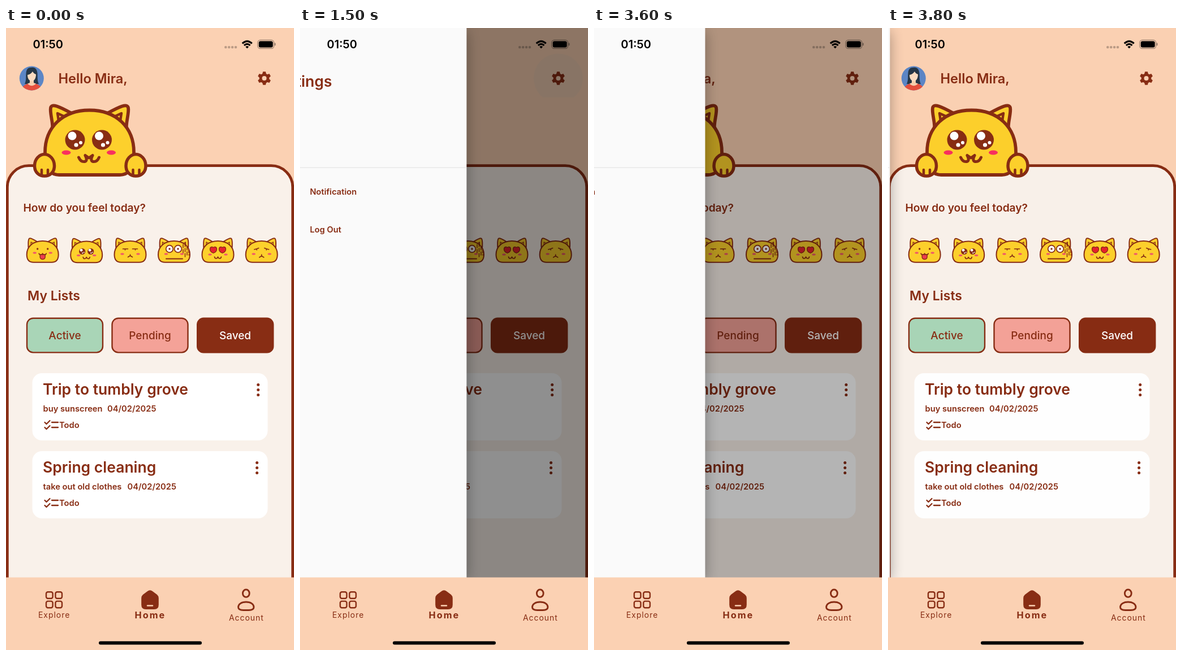
These frames come from a looping animation (509x1101 px, 3.9 s). An HTML page:

```html
<!DOCTYPE html>
<html lang="en">
<head>
<meta charset="utf-8">
<title>Mood lists</title>
<style>
@property --open { syntax: "<number>"; inherits: true; initial-value: 0; }
:root { --brown: #882d14; --peach: #fbd1b3; --yellow: #fdd02c; }
html, body { margin: 0; width: 100%; height: 100%; overflow: hidden; background: var(--peach); }
.stage { position: relative; width: 509px; height: 1101px; overflow: hidden; animation: slide 3900ms step-end infinite; }
.stage > * { position: absolute; left: 0; top: 0; }
svg { display: block; }
.scrim { width: 509px; height: 973px; background: #000; opacity: calc(var(--open) * .54); }
.drawer {
  width: 361.5px; height: 973px; background: #fafafa;
  transform: translateX(calc((var(--open) - 1) * 361.5px));
  opacity: calc(var(--open) * 1000);
  box-shadow: 0 6px 25px rgba(0,0,0,.36);
}
.tap { transform-origin: 456.5px 89px; fill: #97bdcc; animation: tap 3900ms step-end infinite; }
@keyframes slide {
  0% { --open: 0; }
  35.89% { --open: .189; }
  38.455% { --open: .813; }
  41.02% { --open: .969; }
  43.585% { --open: 1; }
  92.3% { --open: .542; }
  94.865% { --open: .1; }
  97.43%, 100% { --open: .008; }
}
@keyframes tap {
  0% { opacity: 0; transform: scale(1); }
  35.89% { opacity: .24; transform: scale(1); }
  38.455% { opacity: .09; transform: scale(1.1); }
  41.02%, 100% { opacity: 0; transform: scale(1.1); }
}
text { font-family: Inter, "Open Sans", sans-serif; font-weight: 600; fill: var(--brown); white-space: pre; }
.title { font-size: 26.5px; }
.note { font-size: 14.7px; }
.btn { font-size: 19px; font-weight: 500; text-anchor: middle; }
.tab { font-size: 14px; font-weight: 400; letter-spacing: .95px; }
.line { fill: none; stroke: var(--brown); stroke-linecap: round; stroke-linejoin: round; }
.coat { fill: var(--yellow); stroke: var(--brown); stroke-linejoin: round; }
.solid { fill: var(--brown); }
.blush { fill: #f0586a; }
.white { fill: #fff; }
</style>
</head>
<body>
<div class="stage">

<svg width="509" height="1101" viewBox="0 0 509 1101">
  <defs>
    <g id="kitty">
      <g id="ear">
        <path class="coat" d="M-24.500 -2C-26 -11 -25.500 -21 -23.500 -22.500C-21 -24 -14 -19.500 -9 -16.500"/>
        <path class="line" d="M-20.500 -11L-20.500 -16L-16 -14" stroke-width="1.300"/>
      </g>
      <use href="#ear" transform="scale(-1 1)"/>
      <path class="coat" d="M-28 6C-28 -8 -17 -18 0 -18S28 -8 28 6C28 15.500 24 19.700 16 19.700H-16C-24 19.700 -28 15.500 -28 6Z"/>
    </g>
    <g id="cheeks">
      <ellipse class="blush" cx="-14" cy="5" rx="3.200" ry="1.700"/>
      <ellipse class="blush" cx="14" cy="5" rx="3.200" ry="1.700"/>
    </g>
    <path id="smile" class="line" d="M-6 10Q-5.500 13 -3 13Q-.5 12.500 0 10Q.5 12.500 3 13Q5.500 13 6 10"/>
    <g id="shine">
      <circle class="solid" r="17.500"/>
      <circle class="white" cx="-5" cy="-7" r="7.500"/>
      <circle class="white" cx="2" cy="9" r="3.600"/>
      <circle class="white" cx="10" cy="5" r="3"/>
    </g>
    <g id="paw">
      <path class="coat" stroke-width="5.500" d="M-17.500 1C-17.500 -11 -9 -19.500 0 -19.500S17.500 -11 17.500 1C17.500 13 9 19 0 19S-17.500 13 -17.500 1Z"/>
      <path class="line" stroke-width="4.500" d="M-5 8V18M6 8V18"/>
    </g>
    <path id="heart" fill="#e6222e" stroke="#882d14" stroke-width="1.300" d="M0 5.500C-4 4 -6 1 -6 -1.500C-6 -6 -1.800 -6.500 0 -4.300C1.800 -6.500 6 -6 6 -1.500C6 1 4 4 0 5.500Z"/>
    <g id="more" class="solid"><circle cy="-9" r="2.500"/><circle r="2.500"/><circle cy="9" r="2.500"/></g>
    <g id="todo">
      <rect class="white" x="46.500" y="0" width="416" height="119" rx="17"/>
      <path class="line" stroke-width="2.300" stroke-linecap="butt" d="M68.500 87L71.500 90L77.500 84M68.500 96L71.500 99L77.500 93M81 87H92M81 96H92"/>
      <text class="note" x="94" y="96.500">Todo</text>
    </g>
    <path id="tooth" class="solid" d="M-3.400 -7.500L-2.400 -11.700H2.400L3.400 -7.500Z"/>
    <clipPath id="bar"><rect x="400" y="40" width="109" height="83"/></clipPath>
    <clipPath id="face"><circle cx="45.300" cy="89" r="21.500"/></clipPath>
  </defs>

  <rect width="509" height="1101" fill="#fbd1b3"/>

  <g clip-path="url(#face)">
    <rect x="23" y="67" width="45" height="45" fill="#5c86c6"/>
    <path fill="#263747" d="M33 99C36 93 35 86 35.500 80C36 72 40 69.500 45 70C51 69 55 73 55.500 80C56 87 55 93 58 99Z"/>
    <path fill="#e44f3d" d="M28 112C28 103 33 100 39 98.500H52C58 100 63 103 63 112Z"/>
    <path fill="#f6cfae" d="M42 90H49V97L53 98.500Q45.500 106 38 98.500L42 97Z"/>
    <path fill="#fbdcc1" d="M38 83Q44 82 47 77Q49 81 53 82C53 90 49.500 94 45.500 94S38 90 38 83Z"/>
  </g>
  <text x="92.500" y="98" font-size="23.600">Hello Mira,</text>

  <g clip-path="url(#bar)"><circle class="tap" cx="456.500" cy="89" r="39.500"/></g>
  <g transform="translate(456.500 89)">
    <circle class="line" r="6.400" stroke-width="4.800"/>
    <use href="#tooth"/>
    <use href="#tooth" transform="rotate(60)"/>
    <use href="#tooth" transform="rotate(120)"/>
    <use href="#tooth" transform="rotate(180)"/>
    <use href="#tooth" transform="rotate(240)"/>
    <use href="#tooth" transform="rotate(300)"/>
  </g>

  <rect x="2.300" y="243.700" width="504.400" height="900" rx="38" fill="#f9f1ea" stroke="#882d14" stroke-width="4.800"/>

  <g stroke-width="5.800">
    <g id="bigEar">
      <path class="coat" d="M82 181C84 168 77 151 79 141C81 133 94 139 116 151"/>
      <path class="line" stroke-width="4.500" d="M93 164L91 151L104 157"/>
    </g>
    <use href="#bigEar" transform="matrix(-1 0 0 1 295 0)"/>
    <path class="coat" d="M69 220C69 176 100 145.500 147.500 145.500S226 176 226 220C226 249 217 260 201 260H94C78 260 69 249 69 220Z"/>
  </g>
  <use href="#paw" transform="translate(68 243)"/>
  <use href="#paw" transform="translate(229.500 243)"/>
  <use href="#shine" transform="translate(122 198)"/>
  <use href="#shine" transform="translate(169.500 198)"/>
  <ellipse cx="106.500" cy="220.500" rx="8" ry="4" fill="#f8305f"/>
  <ellipse cx="186" cy="220.500" rx="8" ry="4" fill="#f8305f"/>
  <path class="line" stroke-width="5" d="M128.500 229Q132 237.500 139 236.500Q145 235 140 225.500M140 225.500L146.500 230L153 225.500M153 225.500Q148 235 154 236.500Q161 237.500 164.500 229"/>

  <text x="30.500" y="325" font-size="19.200">How do you feel today?</text>

  <g stroke-width="2">
    <g transform="translate(64.700 395)">
      <use href="#kitty"/><use href="#cheeks" y="-2"/>
      <circle class="solid" cx="-9" cy="-4" r="1.700"/><circle class="solid" cx="9" cy="-4" r="1.700"/>
      <path fill="#ee3d4f" stroke="#882d14" stroke-width="1.400" d="M-4.500 6H4.500V10Q4.500 14.500 0 14.500T-4.500 10Z"/>
      <path class="line" stroke-width="1.600" d="M-6.500 4Q-6 6.500 -3 6.300Q-.5 6 0 4Q.5 6 3 6.300Q6 6.500 6.500 4"/>
    </g>
    <g transform="translate(142.200 395.500)">
      <use href="#kitty"/><use href="#cheeks" y="2"/>
      <use href="#shine" transform="translate(-7.500 0) scale(.32)"/>
      <use href="#shine" transform="translate(7.500 0) scale(.32)"/>
      <use href="#smile" stroke-width="1.700"/>
    </g>
    <g transform="translate(219.500 395)">
      <use href="#kitty"/><use href="#cheeks" y="0"/>
      <path class="line" stroke-width="1.600" d="M-13 -4H-4M4 -4H13M-9 -3V-2M9 -3V-2M-4 10.500L0 8L4 10.500M0 6V8"/>
    </g>
    <g transform="translate(297 395)">
      <use href="#kitty"/><use href="#cheeks" y="0"/>
      <g class="white" stroke="#882d14" stroke-width="1.700">
        <circle cx="-8" cy="-4" r="6.300"/><circle cx="7" cy="-4" r="6.300"/>
      </g>
      <circle class="solid" cx="-8" cy="-4" r="1.700"/><circle class="solid" cx="7" cy="-4" r="1.700"/>
      <path class="line" stroke-width="2" d="M-14 13.500H15"/>
      <path class="line" stroke-width="1.500" stroke-dasharray="6 3" d="M16 -12V6M19.500 -14V11M23 -8V9M26 -3V7"/>
    </g>
    <g transform="translate(374.500 395)">
      <use href="#kitty"/><use href="#cheeks" y="1"/>
      <use href="#heart" transform="translate(-8 -2)"/><use href="#heart" transform="translate(8 -2)"/>
      <use href="#smile" stroke-width="1.700"/>
    </g>
    <g transform="translate(451.700 395)">
      <use href="#kitty"/><use href="#cheeks" y="0"/>
      <path class="line" stroke-width="1.600" d="M-13 -3Q-9 -3.500 -5 -5.500M5 -5.500Q9 -3.500 13 -3M-8.500 -3V-2M8.500 -3V-2M-4 11L0 8.500L4 11M0 6V8.500"/>
    </g>
  </g>

  <text x="38" y="482" font-size="23">My Lists</text>

  <g stroke="#882d14" stroke-width="2.400">
    <rect x="37" y="513.800" width="134" height="60.600" rx="11" fill="#a9d5b7"/>
    <rect x="187.500" y="513.800" width="134" height="60.600" rx="11" fill="#f4a298"/>
    <rect x="338.200" y="513.800" width="134" height="60.600" rx="11" fill="#882d14"/>
  </g>
  <text class="btn" x="104" y="551">Active</text>
  <text class="btn" x="254.500" y="551">Pending</text>
  <text class="btn" x="405" y="551" style="fill:#fff">Saved</text>

  <use href="#todo" y="611"/>
  <text class="title" x="65" y="649">Trip to tumbly grove</text>
  <text class="note" x="65.500" y="679">buy sunscreen</text>
  <text class="note" x="179" y="679">04/02/2025</text>
  <use href="#more" x="445.700" y="640.500"/>

  <use href="#todo" y="749"/>
  <text class="title" x="65" y="787">Spring cleaning</text>
  <text class="note" x="65.500" y="817">take out old clothes</text>
  <text class="note" x="214.500" y="817">04/02/2025</text>
  <use href="#more" x="443.600" y="778.500"/>
</svg>

<div class="scrim"></div>

<div class="drawer">
  <svg width="361" height="973">
    <text class="title" x="18.500" y="104">Settings</text>
    <rect y="246.500" width="362" height="1.200" fill="#e6e6e6"/>
    <path class="solid" transform="translate(18.700 276) scale(1.200)" d="M12 22c1.100 0 2-.9 2-2h-4c0 1.100.9 2 2 2zM18 16v-5c0-3.100-1.600-5.600-4.500-6.300V4c0-.8-.7-1.500-1.500-1.500s-1.500.7-1.500 1.500v.7C7.600 5.400 6 7.900 6 11v5l-2 2v1h16v-1z"/>
    <path class="line" stroke-width="2.400" stroke-linecap="butt" d="M33 347.200H25.200Q23.500 347.200 23.500 349V364.500Q23.500 366.200 25.200 366.200H33M29 356.700H43M38.200 351.500L43.300 356.700L38.200 362"/>
    <text class="note" x="85" y="295">Notification</text>
    <text class="note" x="85" y="361.500">Log Out</text>
  </svg>
</div>

<svg width="509" height="1101" viewBox="0 0 509 1101">
  <text x="47.500" y="36" font-size="20" style="fill:#000">01:50</text>
  <g fill="#000" opacity=".25">
    <circle cx="388.300" cy="34" r="2.300"/><circle cx="394.200" cy="34" r="2.300"/>
    <circle cx="400.100" cy="34" r="2.300"/><circle cx="406" cy="34" r="2.300"/>
  </g>
  <g fill="none" stroke="#000" stroke-width="3.100">
    <path d="M417.700 27.300Q426.200 19.300 434.700 27.300"/>
    <path d="M420.900 30.900Q426.200 26 431.500 30.900"/>
  </g>
  <path d="M423.300 33.300Q426.200 30.800 429.100 33.300L426.200 36.300Z"/>
  <g fill="none" stroke="#000" stroke-opacity=".4" stroke-width="1.200">
    <rect x="444.800" y="21.300" width="28.800" height="15" rx="4.600"/>
    <path stroke-width="1.800" d="M475.600 26.500V31"/>
  </g>
  <rect x="446.700" y="23.200" width="25" height="11.200" rx="3"/>

  <rect y="972.500" width="509" height="129" fill="#fbd1b3"/>
  <g class="line" stroke-width="2.400">
    <rect x="71" y="998.200" width="11.600" height="11.600" rx="3"/>
    <rect x="87.400" y="998.200" width="11.600" height="11.600" rx="3"/>
    <rect x="71" y="1014.600" width="11.600" height="11.600" rx="3"/>
    <rect x="87.400" y="1014.600" width="11.600" height="11.600" rx="3"/>
  </g>
  <path class="solid" d="M254.500 995.300Q257 995.300 259 997L267 1003Q269.800 1005.500 269.800 1009V1021Q269.800 1029 261.800 1029H247.200Q239.200 1029 239.200 1021V1009Q239.200 1005.500 242 1003L250 997Q252 995.300 254.500 995.300Z"/>
  <path d="M250 1022.500H259" stroke="#fbd1b3" stroke-width="2.400" stroke-linecap="round"/>
  <g class="line" stroke-width="2.900">
    <ellipse cx="424.300" cy="1000.700" rx="5.900" ry="6.700"/>
    <path d="M410.500 1025C410.500 1020 416 1016 424.300 1016S438 1020 438 1025C438 1029 434 1030.500 429 1030.500H419.500C414.500 1030.500 410.500 1029 410.500 1025Z"/>
  </g>
  <text class="tab" x="57" y="1043.500">Explore</text>
  <text x="227.500" y="1045" font-size="16.300" style="font-weight:700;letter-spacing:2px">Home</text>
  <text class="tab" x="394" y="1048.500">Account</text>
  <rect x="164" y="1085.500" width="182" height="6" rx="3"/>
</svg>

</div>
</body>
</html>
```
